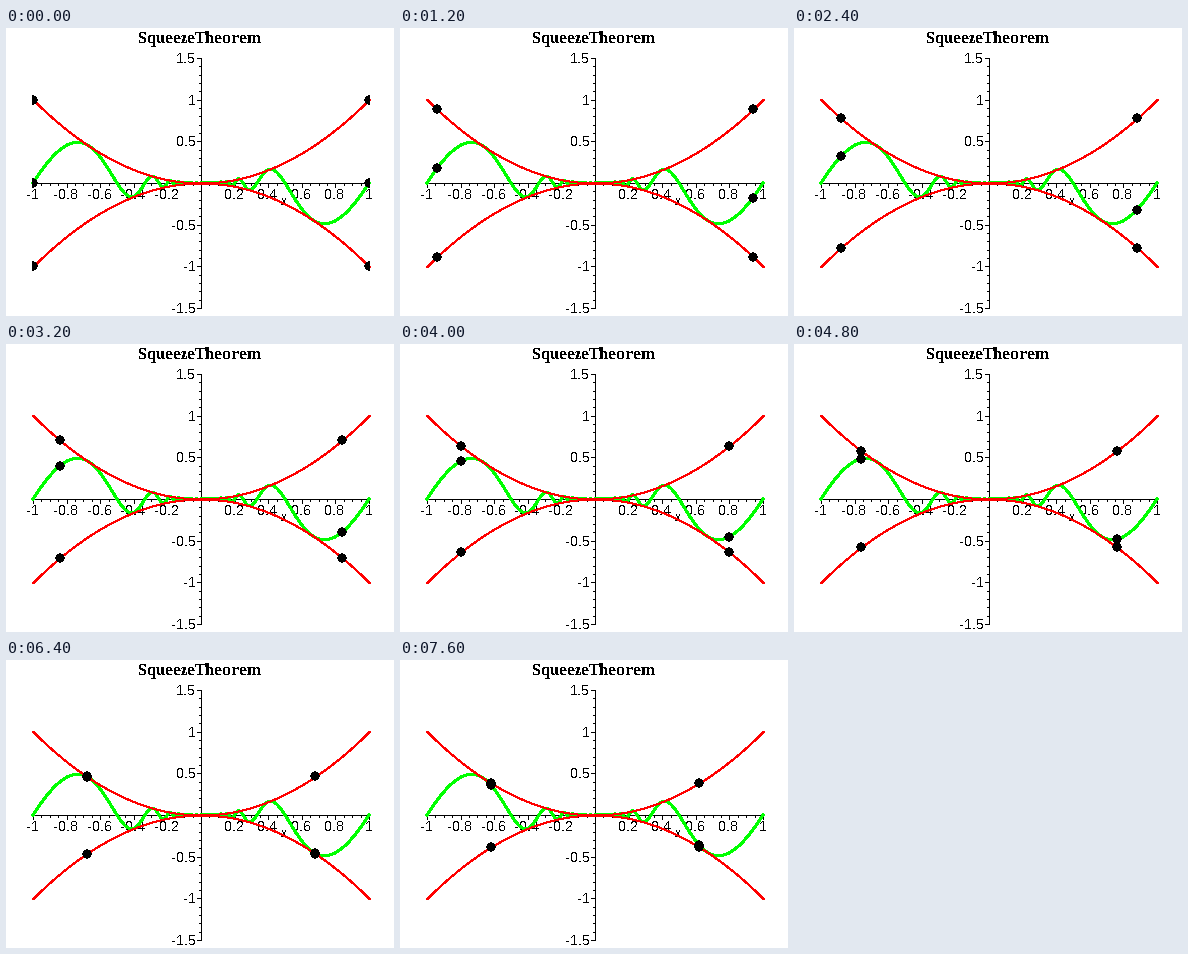
A matplotlib script for the animation above (8 s loop, 388 by 288 pixels).

```python
import numpy as np
import matplotlib.pyplot as plt
from matplotlib.animation import FuncAnimation
from matplotlib.patches import Circle, Rectangle

plt.rcParams["text.hinting"] = "native"
plt.rcParams["text.hinting_factor"] = 1

W, H, DPI = 388, 288, 100
FRAMES, INTERVAL = 20, 400
CX, CY = 195, 155          # pixel of the graph's origin
SX, SY = 168, 250 / 3      # pixels per unit
PT = 72 / DPI              # points per pixel


def px(x):
    return CX + SX * np.asarray(x)


def py(y):
    return CY - SY * np.asarray(y)


def wave(x):
    return x**2 * np.sin(np.pi / x)


fig = plt.figure(figsize=(W / DPI, H / DPI), dpi=DPI, facecolor="white")
ax = fig.add_axes([0, 0, 1, 1])
ax.set_xlim(0, W)
ax.set_ylim(H, 0)
ax.axis("off")


def line(x, y, color="black", width=1, z=1):
    # Odd pens sit on pixel centres, even pens on pixel edges.
    shift = width % 2 / 2
    ax.plot(np.add(x, shift), np.add(y, shift), color=color, lw=width * PT,
            antialiased=False, snap=False, solid_capstyle="projecting",
            zorder=z)


def label(x, y, text, size=14, ha="center", **font):
    ax.text(x, y, text, fontsize=size * PT, ha=ha, va="baseline",
            antialiased=False, zorder=2,
            **{"family": "Liberation Sans", **font})


def draw_axes():
    line([px(-1), px(1)], [CY, CY])
    line([CX, CX], [py(1.5), py(-1.5)])
    for i in range(-20, 21):
        x = np.round(px(i / 20))
        line([x, x], [CY, CY + (4 if i % 4 == 0 else 2)])
        if i and i % 4 == 0:
            label(px(i / 20) - 0.5, 171, f"{i / 20:g}")
    for i in range(-15, 16):
        y = np.round(py(i / 10))
        line([CX - (4 if i % 5 == 0 else 2), CX], [y, y])
        if i and i % 5 == 0:
            label(190, y + 5, f"{i / 10:g}", ha="right")
    label(278, 177, "x")
    label(194, 15, "SqueezeTheorem", size=17.33,
          family="Liberation Serif", weight="bold")


def draw_curves():
    x = np.linspace(-1, 1, 600)    # even count, so zero is never sampled
    line(px(x), py(wave(x)), "#00ff00", 2, z=3)
    for sign in (1, -1):
        line(px(x), py(sign * x**2), "#ff0000", 1, z=4)


def make_dot():
    dot = ax.add_patch(Circle((0, 0), 2.5, fill=False, ec="black",
                              lw=3 * PT, antialiased=False, snap=False,
                              zorder=5))
    dot.set_clip_path(Rectangle((26, 0), 338, H, transform=ax.transData))
    return dot


draw_axes()
draw_curves()
dots = [make_dot() for _ in range(6)]


def update(frame):
    x = (1 - 0.02 * frame) * np.array([-1, 1])
    heights = np.concatenate([x**2, wave(x), -x**2])
    centers = np.round(np.column_stack([px(np.tile(x, 3)), py(heights)]))
    for dot, center in zip(dots, centers):
        dot.set_center(center)
    return dots


anim = FuncAnimation(fig, update, frames=FRAMES, interval=INTERVAL,
                     repeat=True, repeat_delay=0, blit=False)
plt.show()
```
